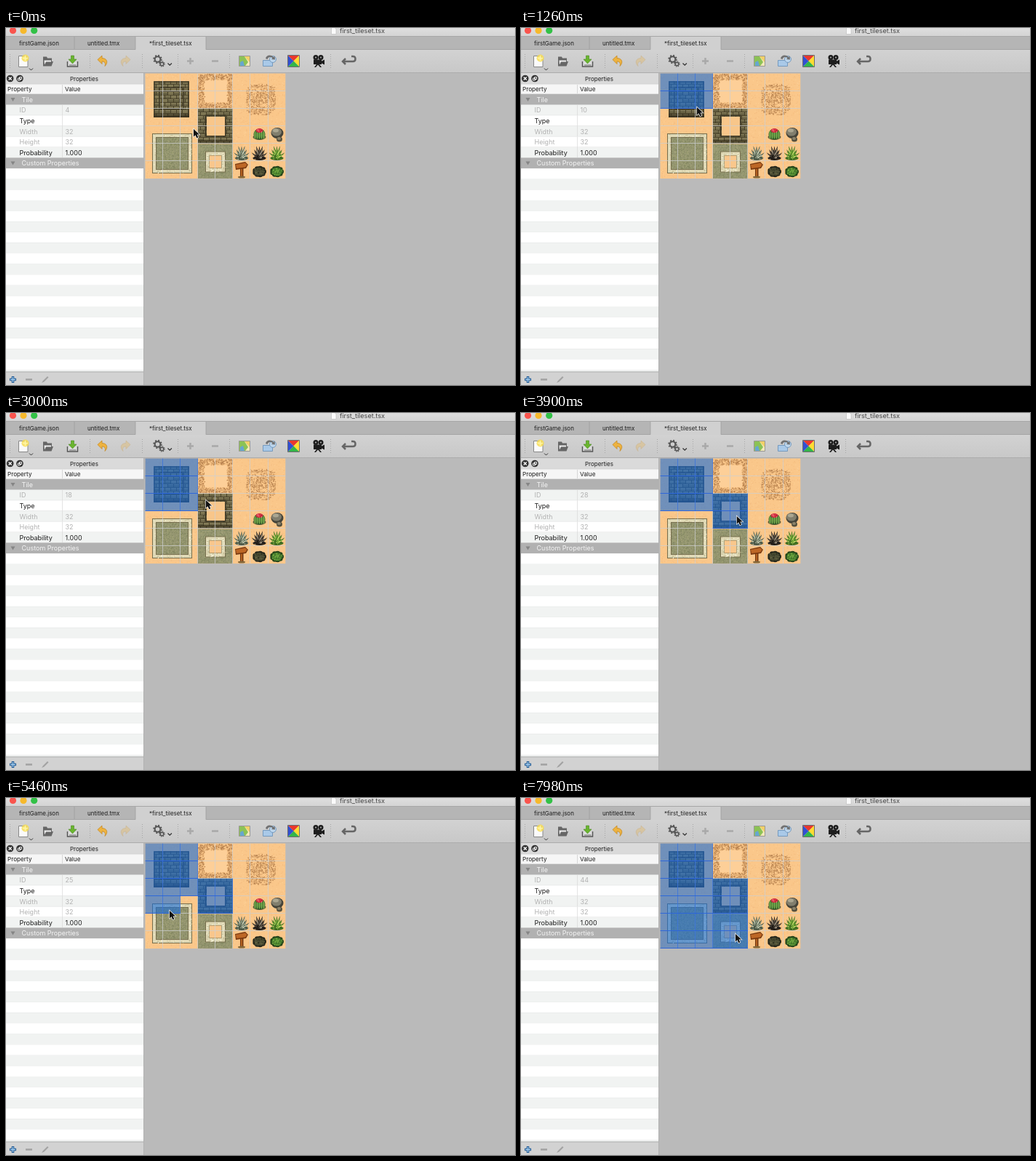
Recreate the animation shown at these times as an HTML page with a canvas. Size 700x491 px, loop 8 s.

```html
<!DOCTYPE html>
<html lang="en">
<head>
<meta charset="utf-8">
<title>Tileset editor</title>
<style>
  html, body { margin: 0; width: 100%; height: 100%; overflow: hidden; background: #bababa; }
  svg, canvas { position: absolute; left: 0; top: 0; width: 700px; height: 491px; }
  text { font: 8px Inter, Roboto, sans-serif; fill: #1c1c1c; }
  .row text { font-size: 9px; }
  .row .dim { fill: #b2b2b2; }
  .row .head { fill: #f4f4f4; }
</style>
</head>
<body>
<svg id="ui" viewBox="0 0 700 491">
  <defs>
    <linearGradient id="title" x2="0" y2="1"><stop stop-color="#dedede"/><stop offset="1" stop-color="#d3d3d3"/></linearGradient>
    <linearGradient id="bar" x2="0" y2="1"><stop stop-color="#d2d2d2"/><stop offset="1" stop-color="#c8c8c8"/></linearGradient>
  </defs>
  <rect width="700" height="491" fill="#bababa"/>

  <!-- window title and tabs -->
  <rect width="700" height="12" fill="url(#title)"/>
  <circle cx="9.5" cy="3.5" r="4.6" fill="#f9544d"/>
  <circle cx="24" cy="3.5" r="4.6" fill="#f6b92c"/>
  <circle cx="38.7" cy="3.5" r="4.6" fill="#32c146"/>
  <path d="M447.5-1h4l2.5 2.5v7h-6.5z" fill="#fafafa" stroke="#bbb" stroke-width=".6"/>
  <text x="459" y="7" style="font-size:9.1px;fill:#444">first_tileset.tsx</text>
  <rect y="11.5" width="700" height="18" fill="#b5b5b5"/>
  <path d="M0 11.5H700M94 12V29M178 12V29M275 12V29M0 29.5H178M275 29.5H700" stroke="#a0a0a0" stroke-width=".8"/>
  <rect x="178.5" y="12" width="96" height="18" fill="#d0d0d0"/>
  <text x="18" y="23.5">firstGame.json</text>
  <text x="112" y="23.5">untitled.tmx</text>
  <text x="197" y="23.5">*first_tileset.tsx</text>

  <!-- toolbar -->
  <rect y="30" width="700" height="32" fill="url(#bar)"/>
  <path d="M0 61.5H700" stroke="#acacac"/>
  <path d="M5.5 36V56M115.5 36V56M187.5 36V56M236.5 36V56M307.5 36V56M446.5 36V56" stroke="#a6a6a6" stroke-dasharray="1 2"/>
  <g stroke-width="1">
    <path d="M17.5 38.5h9l3.5 3.5v11.5h-12.5z" fill="#fafafa" stroke="#888"/>
    <circle cx="26.5" cy="41.5" r="5" fill="#f7dc4c" opacity=".8"/>
    <path d="M26.5 38v7M23 41.5h7" stroke="#fff6a8" stroke-width="1.5"/>
    <path d="M32 55.5l2.5 2.5 2.5-2.5" fill="none" stroke="#333"/>
    <path d="M51 52V39.5h5l1 2h6V46h2l-2.5 6.5H51z" fill="#666"/>
    <path d="M52.5 44.5h9.5v2h-7l-2 4z" fill="#eee"/>
    <path d="M84.5 46v7h14v-7" fill="#ddd" stroke="#555" stroke-width="1.5"/>
    <path d="M87 51h9.5" stroke="#666"/>
    <path d="M89.5 38h4v5h3.5l-5.5 6-5.5-6h3.5z" fill="#6ab52f" stroke="#478721" stroke-width=".6"/>
    <path id="arrow" d="M126 43.5l6-5.5v3.5c7 0 9 6 4 11 1.5-5-1-6.5-4-6.5v3.5z" fill="#eeb340" stroke="#c58a24" stroke-width=".8"/>
    <use href="#arrow" transform="matrix(-1 0 0 1 297 0)" opacity=".3"/>
  </g>
  <g fill="none" stroke="#555">
    <circle cx="208.5" cy="43" r="3.8" stroke-width="2"/>
    <circle cx="208.5" cy="43" r="5.3" stroke-width="1.8" stroke-dasharray="2 2.16"/>
    <circle cx="214.5" cy="49.5" r="2.3" stroke-width="1.6"/>
    <circle cx="214.5" cy="49.5" r="3.6" stroke-width="1.2" stroke-dasharray="1.4 1.42"/>
    <path d="M222.5 48.5l2.7 2.7 2.7-2.7" stroke="#333" stroke-width="1.3"/>
  </g>
  <path d="M249 45.5h9M253.5 41v9M283 45.5h9" stroke="#a9a9a9" stroke-width="2.5"/>
  <g stroke-width=".8">
    <path d="M320.5 38.5h15v14h-15z" fill="#f1e8ba" stroke="#888"/>
    <path d="M321 39h7l5 8-4 5h-8z" fill="#8cc255"/>
    <path d="M328 39h7v8z" fill="#f2cf66"/>
    <path d="M322 47l4-2 2 7h-6z" fill="#67a6d0"/>
    <path d="M353.5 44.5h13v8h-13z" fill="#a9c9e8" stroke="#658eb6"/>
    <circle cx="367" cy="43" r="4.5" fill="#bcd5ec" stroke="#658eb6"/>
    <path d="M357 42c1-5 7-6 11-2l1.5-1.5.5 5-5-.5 1.5-1.5c-3-2.5-6-1.5-7 1.5z" fill="#707070"/>
    <path d="M388 38h15l-7.5 7.5z" fill="#e9382e"/>
    <path d="M403 38v15l-7.5-7.5z" fill="#ffdc31"/>
    <path d="M403 53h-15l7.5-7.5z" fill="#32b64a"/>
    <path d="M388 53V38l7.5 7.5z" fill="#314fd3"/>
    <path d="M387.5 37.5h16v16h-16z" fill="none" stroke="#555"/>
  </g>
  <g fill="#1d1d1d">
    <circle cx="426" cy="40.5" r="3.5"/><circle cx="433" cy="40.5" r="3.5"/>
    <path d="M423 43.5h11v2l4-2v7l-4-2v1.5h-3l3 4h-2l-3-3.5-3 3.5h-2l3-4h-4z"/>
    <circle cx="426" cy="40.5" r="1" fill="#bbb"/><circle cx="433" cy="40.5" r="1" fill="#bbb"/>
  </g>
  <path d="M467 42l-4 4 4 4M464 46h13q3.5 0 3.5-3.5t-3.5-3.5h-2" fill="none" stroke="#666" stroke-width="2.5"/>

  <!-- properties panel -->
  <rect y="62" width="190" height="429" fill="#d2d2d2"/>
  <rect y="62" width="190" height="15.5" fill="#dadada"/>
  <circle cx="5.7" cy="69.5" r="4.8" fill="#333"/>
  <path d="M3.7 67.5l4 4m0-4l-4 4" stroke="#fff" stroke-width="1.3"/>
  <circle cx="19" cy="69.5" r="4.8" fill="#333"/>
  <path d="M18.5 67.5h3v3h-3zM16.5 69h3v3h-3z" fill="#333" stroke="#fff" stroke-width=".9"/>
  <text x="88" y="72.6">Properties</text>
  <rect y="77" width="190" height="14" fill="#f6f6f6"/>
  <path d="M0 77H190M0 90.8H190M77.5 78V90" stroke="#cfcfcf" stroke-width=".8"/>
  <text x="2" y="87" style="font-size:8.2px">Property</text>
  <text x="81" y="87" style="font-size:8.2px">Value</text>
  <g id="rows" class="row"></g>
  <path d="M0 473H190M189.5 62V491" stroke="#b1b1b1"/>
  <path d="M5 483.5h9M9.5 479v9" stroke="#245b94" stroke-width="3.5"/>
  <path d="M6 483.5h7M9.5 480v7" stroke="#a3cdef" stroke-width="1.3"/>
  <path d="M27 483.5h9" stroke="#a2a2a2" stroke-width="2.5"/>
  <path d="M49 488l2-3 6-6 1.5 1.5-6 6z" fill="#a2a2a2"/>
</svg>
<canvas id="tiles" width="700" height="491"></canvas>
<canvas id="overlay" width="700" height="491"></canvas>

<script>
const LOOP = 8000, STEP = 60;
const LEFT = 191.5, TOP = 62.5, TILE = 24.1, COLS = 8, ROWS = 6;
const $ = id => document.getElementById(id);

// Property rows
const ROW_H = 14.6;
const props = [['Tile'], ['ID', '4', 'dim'], ['Type', ''], ['Width', '32', 'dim'],
  ['Height', '32', 'dim'], ['Probability', '1.000'], ['Custom Properties']];
let rowMarkup = '';
for (let i = 0; i < 27; i++) {
  const y = 91 + i * ROW_H, [name, value, style = ''] = props[i] || [];
  const heading = name && value === undefined;
  const shaded = i < 6 ? i % 2 : i % 2 === 0;
  const fill = heading ? '#b1b1b1' : shaded ? '#f1f3f2' : '#fff';
  const h = Math.min(ROW_H, 472.5 - y);
  rowMarkup += `<rect y="${y}" width="189" height="${h}" fill="${fill}"/>`;
  if (heading) {
    rowMarkup += `<path d="M6.5 ${y + 5}h6l-3 5z" fill="#858585"/>
      <text class="head" x="21.5" y="${y + 10.7}">${name}</text>`;
  } else if (name) {
    rowMarkup += `<path d="M0 ${y + ROW_H}H189M77.5 ${y}v${ROW_H}" stroke="#d9d9d9" stroke-width=".7"/>
      <text class="${style}" x="18.5" y="${y + 10.7}">${name}</text>
      <text class="${style}" id="value${name}" x="81.5" y="${y + 10.7}">${value}</text>`;
  }
}
$('rows').innerHTML = rowMarkup;
const idText = $('valueID');

// Tileset artwork
const art = $('tiles').getContext('2d');
let seed = 7;
const random = () => (seed = (seed * 16807) % 2147483647) / 2147483647;
const pick = list => list[Math.floor(random() * list.length)];

function box(x, y, w, h, color) {
  art.fillStyle = color;
  art.fillRect(x, y, w, h);
}
function speckle(x, y, w, h, count, colors, keep = () => true) {
  for (let i = 0; i < count; i++) {
    const px = x + random() * w, py = y + random() * h;
    if (keep(px, py)) box(px, py, 1.2, 1, pick(colors));
  }
}
function bricks(x, y, w, h) {
  box(x, y, w, h, '#484129');
  for (let r = 0; r * 5 < h; r++) {
    for (let bx = r % 2 ? -4 : 0; bx < w; bx += 8) {
      const l = Math.max(bx, 0), bw = Math.min(bx + 7, w) - l, bh = Math.min(4, h - r * 5);
      box(x + l, y + r * 5, bw, bh, pick(['#71694a', '#7b7350', '#676143']));
      box(x + l, y + r * 5, bw, 1, '#8d8560');
    }
  }
}
function moss(x, y, w, h) {
  box(x, y, w, h, '#949570');
  speckle(x, y, w - 1, h - 1, w * h * .35, ['#848964', '#a5a47d', '#7c825b', '#a0a273']);
}
function whiteRim(x, y, w, h, t) {
  art.lineWidth = t + 2;
  art.strokeStyle = '#766e4d';
  art.strokeRect(x + t / 2, y + t / 2, w - t, h - t);
  art.lineWidth = t;
  art.strokeStyle = '#dfd9b6';
  art.strokeRect(x + t / 2, y + t / 2, w - t, h - t);
  speckle(x, y, w, h, w * 5, ['#fbf8df', '#bdb58c'], (px, py) =>
    px < x + t - 1 || px > x + w - t || py < y + t - 1 || py > y + h - t);
}
function blob(x, y, rx, ry, color) {
  art.fillStyle = color;
  art.beginPath();
  art.ellipse(x, y, rx, ry, 0, 0, 7);
  art.fill();
}
function shape(color, ...pts) {
  art.fillStyle = color;
  art.beginPath();
  for (let i = 0; i < pts.length; i += 2) art.lineTo(pts[i], pts[i + 1]);
  art.fill();
}
function plant(x, y, dark, mid, light) {
  blob(x, y + 7, 9, 3, dark);
  for (let i = 0; i < 9; i++) {
    const a = Math.PI * (1.02 + i * .12), len = 10.5 + (i % 2) * 1.5;
    const tx = x + Math.cos(a) * len, ty = y + 8 + Math.sin(a) * (len + 6);
    shape(dark, x - 3.5, y + 8, tx, ty - 1, x + 3.5, y + 8);
    shape(i % 2 ? light : mid, x - 2, y + 7, tx, ty + 1, x + 2, y + 7);
  }
  speckle(x - 7, y, 14, 8, 16, [dark, light]);
}
function bush(x, y, dark, mid, light) {
  for (let i = 0; i < 9; i++) {
    const a = i * Math.PI / 4.5;
    blob(x + Math.cos(a) * 6, y + Math.sin(a) * 4.5, 3.5, 3.3, dark);
  }
  blob(x, y, 7, 5.5, mid);
  speckle(x - 7, y - 5, 14, 10, 65, [dark, light, mid]);
}

function drawTileset() {
  const w = TILE * COLS, h = TILE * ROWS;
  box(LEFT, TOP, w, h, '#fac78a');
  speckle(LEFT, TOP, w - 1, h - 1, 2200, ['#f6bf7f', '#fdd096', '#f3bc80']);

  bricks(203, 73, 49, 50);
  art.strokeStyle = '#433d28';
  art.lineWidth = 1.5;
  art.strokeRect(204, 74, 47, 48);
  art.strokeRect(211, 82, 33, 29);
  box(203, 118, 49, 5, 'rgba(45,38,22,.5)');

  const grit = ['#b98350', '#a87243', '#cc975f', '#d8a46c'];
  box(273, 72, 31, 30, '#fdcf98');
  speckle(264, 63, 47, 47, 1500, grit, (x, y) =>
    Math.max(Math.abs(x - 288), Math.abs(y - 87)) > 15 + random() * 2);
  speckle(330, 77, 40, 42, 680, grit, (x, y) =>
    Math.hypot(x - 350.5, y - 98) < 23 + random() * 3);

  bricks(264, 111, 48, 48);
  art.strokeStyle = '#3f3926';
  art.lineWidth = 2;
  art.strokeRect(274.5, 120.5, 27, 28);
  box(276, 122, 25, 26, '#f8c68a');
  box(264, 154, 48, 5, 'rgba(45,38,22,.45)');

  moss(201, 145, 55, 55);
  whiteRim(202, 146, 53, 53, 4);
  moss(264, 159.5, 48, 47.5);
  whiteRim(275, 170.5, 26, 27, 4.5);
  box(280, 175.5, 16, 17, '#f9c78c');

  // cactus
  blob(348.5, 150, 9, 4, '#62603b');
  blob(348.5, 146, 8, 7.5, '#2e5528');
  for (let i = -2; i <= 2; i++) blob(348.5 + i * 3, 147, 1.1, 5.5, '#79ad4d');
  blob(348.5, 141, 5, 3, '#d93546');
  speckle(344, 138.5, 8, 4, 9, ['#ff9b9b', '#a41c2e']);

  // rocks
  blob(373, 144.5, 8.5, 7.5, '#45443a');
  blob(372, 143, 7, 5.5, '#817e6d');
  blob(371, 141, 4, 2.5, '#aaa691');
  blob(376, 153, 4, 3.5, '#55503e');
  blob(375.5, 152, 2.5, 2, '#8c836b');

  plant(324, 172, '#4c5948', '#9eaa91', '#d2d8bd');
  plant(348.5, 172, '#211c18', '#62584a', '#a59a86');
  plant(372.5, 172, '#3b6920', '#82bd3b', '#c5e469');

  // signpost
  box(322, 189, 4.5, 16, '#713610');
  box(323, 189, 2, 15, '#b36121');
  shape('#793a11', 315, 187, 329, 184, 333, 188, 330, 193, 316, 195);
  shape('#bd6726', 316, 188, 329, 185.5, 331.5, 188, 329, 191.5, 317, 193);
  blob(324, 205, 5, 1.5, '#83673a');

  bush(348.5, 197.5, '#25271b', '#4c4e34', '#777650');
  bush(372.5, 197.5, '#24451a', '#4e8930', '#8cbe50');

  art.fillStyle = 'rgba(205,208,210,.72)';
  for (let c = 1; c < COLS; c++) art.fillRect(Math.round(LEFT + c * TILE - .7), TOP, 1, h);
  for (let r = 1; r < ROWS; r++) art.fillRect(LEFT, Math.round(TOP + r * TILE - .7), w, 1);
}
drawTileset();

// Pointer path: time, x, y
const path = [
  [0, 258, 139], [300, 233, 106], [780, 199, 71], [900, 201, 73], [1260, 242, 109],
  [1620, 249, 121], [2160, 249, 121], [2700, 275, 120], [3000, 275, 120], [3120, 273, 120],
  [3300, 273, 120], [3840, 296, 141], [4140, 300, 146], [4380, 300, 148], [4500, 300, 148],
  [4680, 241, 154], [5040, 201, 143], [5340, 203, 144], [5460, 225, 155], [5900, 246, 184],
  [6180, 250, 192], [6480, 250, 192], [6780, 276, 171], [7200, 273, 166], [7320, 273, 166],
  [7620, 288, 180], [7980, 295, 187]
];
// Drags: press time, release time, first column, first row
const drags = [[840, 1680, 0, 0], [3360, 4200, 3, 2], [5280, 6180, 0, 3], [7380, LOOP, 3, 4]];

function pointerAt(time) {
  const next = path.findIndex(key => key[0] > time);
  if (next < 0) return path[path.length - 1].slice(1);
  const [t0, x0, y0] = path[next - 1], [t1, x1, y1] = path[next];
  const k = (time - t0) / (t1 - t0);
  return [x0 + (x1 - x0) * k, y0 + (y1 - y0) * k];
}

const view = $('overlay').getContext('2d');
const pointer = new Path2D('M0 0V10.5L2.5 8.3 4.3 12.3 6.3 11.4 4.6 7.6H8z');

function drawSelection(c0, r0, c1, r1) {
  const x = LEFT + c0 * TILE, y = TOP + r0 * TILE;
  const w = (c1 - c0 + 1) * TILE, h = (r1 - r0 + 1) * TILE;
  view.fillStyle = 'rgba(20,108,218,.6)';
  view.fillRect(x, y, w, h);
  view.fillStyle = 'rgba(38,96,220,.5)';
  for (let c = c0 + 1; c <= c1 + 1; c++) view.fillRect(Math.round(LEFT + c * TILE - .7), y, 1, h);
  view.fillStyle = 'rgba(38,96,220,.85)';
  for (let r = r0 + 1; r <= r1 + 1; r++) view.fillRect(x, Math.round(TOP + r * TILE - .7), w, 1);
}

function render(now) {
  const time = Math.floor((now % LOOP) / STEP) * STEP;
  const [x, y] = pointerAt(time);
  let id = 4;
  view.clearRect(0, 0, 700, 491);
  for (const [press, release, col, row] of drags) {
    if (time < press) break;
    const [px, py] = pointerAt(Math.min(time, release));
    const c = Math.max(col, Math.floor((px - LEFT) / TILE));
    const r = Math.max(row, Math.floor((py - TOP) / TILE));
    drawSelection(col, row, c, r);
    id = r * COLS + c;
  }
  if (idText.textContent !== String(id)) idText.textContent = id;

  view.save();
  view.translate(x, y);
  view.lineWidth = 1.4;
  view.strokeStyle = '#eee';
  view.stroke(pointer);
  view.fillStyle = '#111';
  view.fill(pointer);
  view.restore();
}

const start = performance.now();
function tick() {
  render(Math.max(0, performance.now() - start));
  requestAnimationFrame(tick);
}
tick();
</script>
</body>
</html>
```
